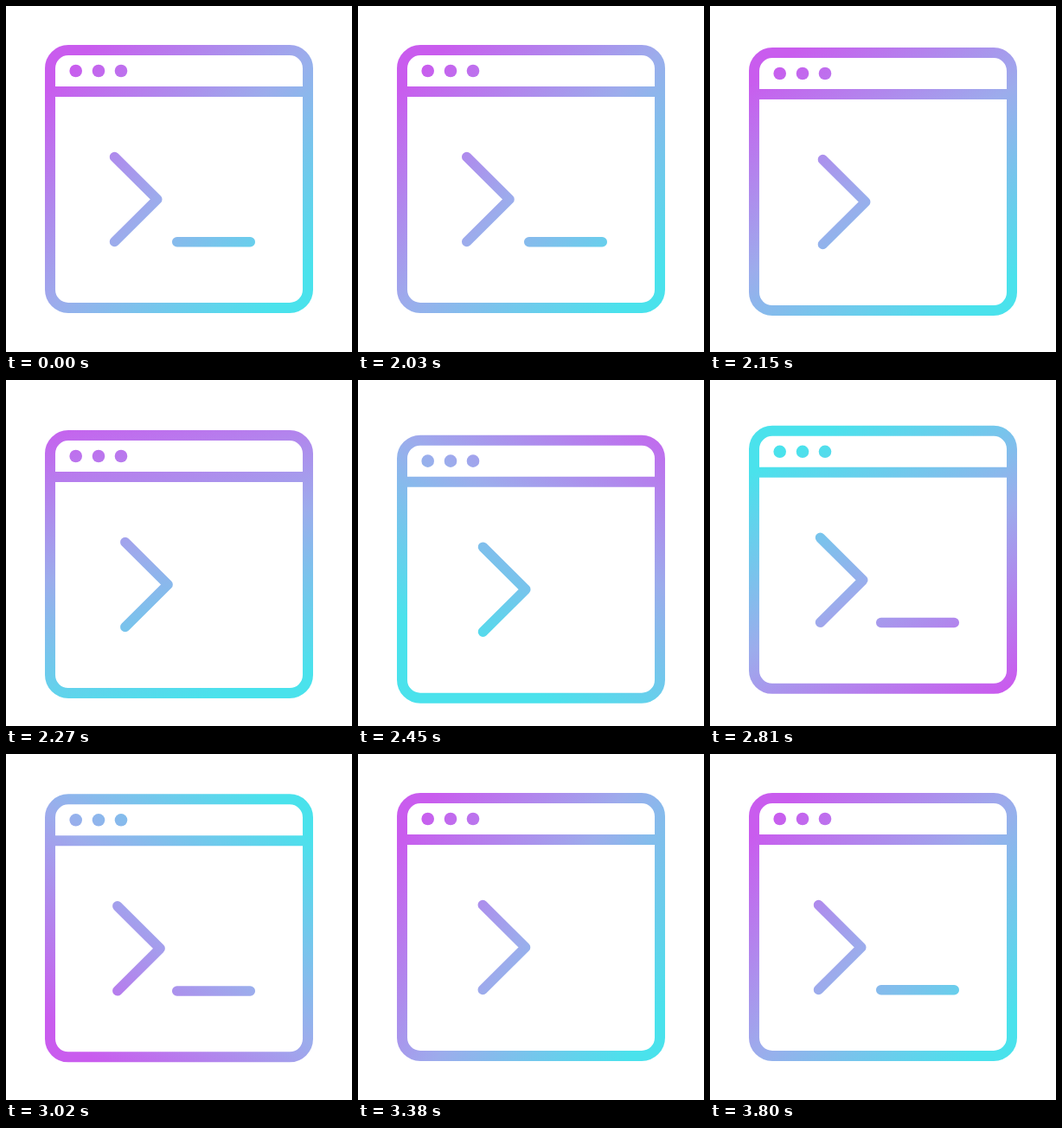
An HTML page with a canvas that plays this animation: 400 by 400 pixels, repeating every 3.83 s.

```html
<!DOCTYPE html>
<html lang="en">
<head>
<meta charset="utf-8">
<title>Terminal window</title>
<style>
  html, body { margin: 0; width: 100%; height: 100%; overflow: hidden; background: #fff; }
  canvas { display: block; }
</style>
</head>
<body>
<canvas id="stage" width="400" height="400"></canvas>
<script>
const ctx = document.getElementById('stage').getContext('2d');
const LOOP = 3830, HOLD = 2000, STEP = 30;

const clamp = v => Math.min(1, Math.max(0, v));

// Ease in and out from 0 to 1 between two steps
function ease(step, from, to) {
  const p = clamp((step - from) / (to - from));
  return p * p * (3 - 2 * p);
}

function gradient(step) {
  const angle = Math.PI / 4 + 2 * Math.PI * ease(step, 0, 51);
  const shift = 54 * Math.sin(Math.PI * clamp((step - 5) / 29)) ** 2;
  const dx = Math.cos(angle), dy = Math.sin(angle);
  const at = d => [200 + dx * d, 200 + dy * d];
  const g = ctx.createLinearGradient(...at(-180 - shift), ...at(180 - shift));
  g.addColorStop(0, '#c95cee');
  g.addColorStop(0.5, '#9cacec');
  g.addColorStop(1, '#4ae2ec');
  return g;
}

function line(width, ...points) {
  ctx.lineWidth = width;
  ctx.beginPath();
  points.forEach(([x, y]) => ctx.lineTo(x, y));
  ctx.stroke();
}

function draw(step) {
  const drop = 19 * (ease(step, 2.3, 13) - ease(step, 13, 38));
  const phase = step % 30;
  const nudge = 19 * (ease(phase, 0, 15) - ease(phase, 15, 30));
  const cursorOn = phase < 5 || phase >= 20;

  ctx.fillStyle = '#fff';
  ctx.fillRect(0, 0, 400, 400);
  ctx.fillStyle = ctx.strokeStyle = gradient(step);
  // The colours stay in place while the window moves
  const y = v => v + drop;

  ctx.lineWidth = 12;
  ctx.lineCap = 'butt';
  ctx.beginPath();
  ctx.roundRect(51, y(51), 298, 298, 21);
  ctx.stroke();
  line(12, [51, y(99)], [349, y(99)]);

  for (const x of [80.7, 107, 133]) {
    ctx.beginPath();
    ctx.arc(x, y(75), 7.3, 0, 2 * Math.PI);
    ctx.fill();
  }

  ctx.lineCap = ctx.lineJoin = 'round';
  const x = 125.5 + nudge;
  line(11.5, [x, y(174.5)], [x + 49.3, y(223.5)], [x, y(272.5)]);
  if (cursorOn) line(11.5, [197.7, y(272.7)], [282.3, y(272.7)]);
}

function tick() {
  const time = performance.now() % LOOP;
  draw(Math.max(0, Math.floor((time - HOLD) / STEP)));
  requestAnimationFrame(tick);
}
tick();
</script>
</body>
</html>
```
